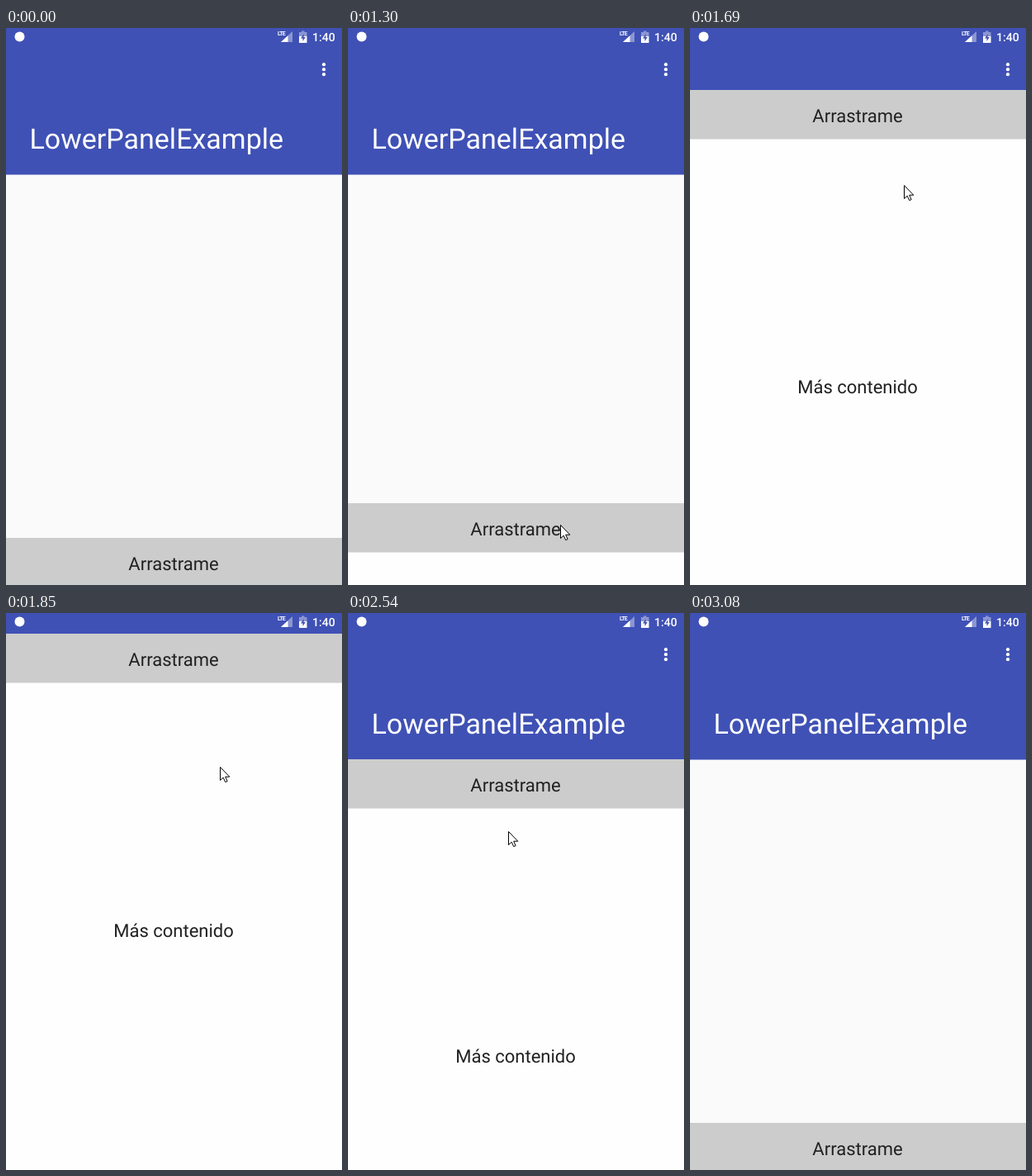
Recreate the animation shown at these times as an HTML page. Size 407 by 674 pixels, loop 3630 ms.

```html
<!DOCTYPE html>
<html lang="es">
<head>
<meta charset="utf-8">
<title>Bottom sheet</title>
<style>
  html, body { margin: 0; width: 100%; height: 100%; overflow: hidden; background: #fafafa; }
  svg { display: block; width: 407px; height: 674px; font-family: Roboto, sans-serif; }
  text { text-rendering: geometricPrecision; }
  .label { font-size: 22px; fill: #212121; text-anchor: middle; }
  .lte { font-size: 7px; font-weight: 700; letter-spacing: -.8px; }
  .faint { opacity: .4; }
</style>
</head>
<body>
<svg viewBox="0 0 407 674">
  <rect width="407" height="674" fill="#fafafa"/>
  <rect width="407" height="177.5" fill="#3f51b5"/>

  <g fill="#fff">
    <circle cx="16.5" cy="10.5" r="6"/>
    <text class="lte" x="329" y="9">LTE</text>
    <path class="faint" d="M347 4V17H333Z"/>
    <path d="M341.5 9.2V17H333Z"/>
    <path class="faint" d="M358 3.5h3.5V5h3v5H355V5h3Z"/>
    <path d="M355 10h9.5v8H355Z"/>
    <path d="M361 7L357 12.500H359.500V16L362.800 11H360.500Z" fill="#3f51b5"/>
    <text x="371" y="16" font-size="14" font-weight="500">1:40</text>
    <circle cx="385" cy="44.2" r="2.1"/>
    <circle cx="385" cy="50.2" r="2.1"/>
    <circle cx="385" cy="56.2" r="2.1"/>
    <text x="28.5" y="146" font-size="34">LowerPanelExample</text>
  </g>

  <g id="sheet">
    <rect width="407" height="674" fill="#fefefe"/>
    <rect width="407" height="59.5" fill="#ccc"/>
    <text class="label" x="203" y="39">Arrastrame</text>
    <text class="label" x="203" y="367">Más contenido</text>
  </g>

  <path id="cursor" d="M.5 .5V16.5L4.2 13.2L6.7 18.6L9.1 17.6L6.7 12.2H11.8Z" fill="#fff" stroke="#000"/>
</svg>
<script>
const LOOP = 3630, TICK = 77;   // the screen refreshes once per tick
const sheet = document.getElementById('sheet');
const cursor = document.getElementById('cursor');

const linear = u => u;
const speedUp = u => u * u;
const slowDown = u => Math.sin(u * Math.PI / 2);
const settle = u => 1 - (1 - u) ** 5;

function draw(now) {
  const tick = Math.floor((now % LOOP + 13) / TICK);
  // Share of a move between two ticks that is done by now
  const done = (from, to, ease = linear) =>
    ease(Math.min(1, Math.max(0, (tick - from) / (to - from))));

  // Dragged up, flung open, dragged down, flung closed
  const top = 617 - 261 * done(15, 20, speedUp) - 334 * done(20, 26.5, settle)
    + 466 * done(32, 35) + 129 * done(35, 40.6, settle);

  // Enters, drags up, wanders, then jumps back and drags down off the stage
  const x = 260 - 4 * done(6, 9) + 3 * done(15, 20) - 40 * done(24, 30)
    - 27 * done(31, 32) + 10 * done(32, 38);
  const y = 670 - 15 * done(6, 9) - 336 * done(15, 20, speedUp) - 133 * done(20, 24, settle)
    - 134 * done(24, 30) + 60 * done(31, 32) + 588 * done(32, 38, slowDown);

  const place = (node, x, y) =>
    node.setAttribute('transform', `translate(${Math.round(x)} ${Math.round(y)})`);
  place(sheet, 0, top);
  place(cursor, x, y);
  cursor.setAttribute('visibility', tick >= 6 && tick < 38 ? 'visible' : 'hidden');
}

const start = performance.now();
function loop() {
  draw(performance.now() - start);
  requestAnimationFrame(loop);
}
loop();
</script>
</body>
</html>
```
